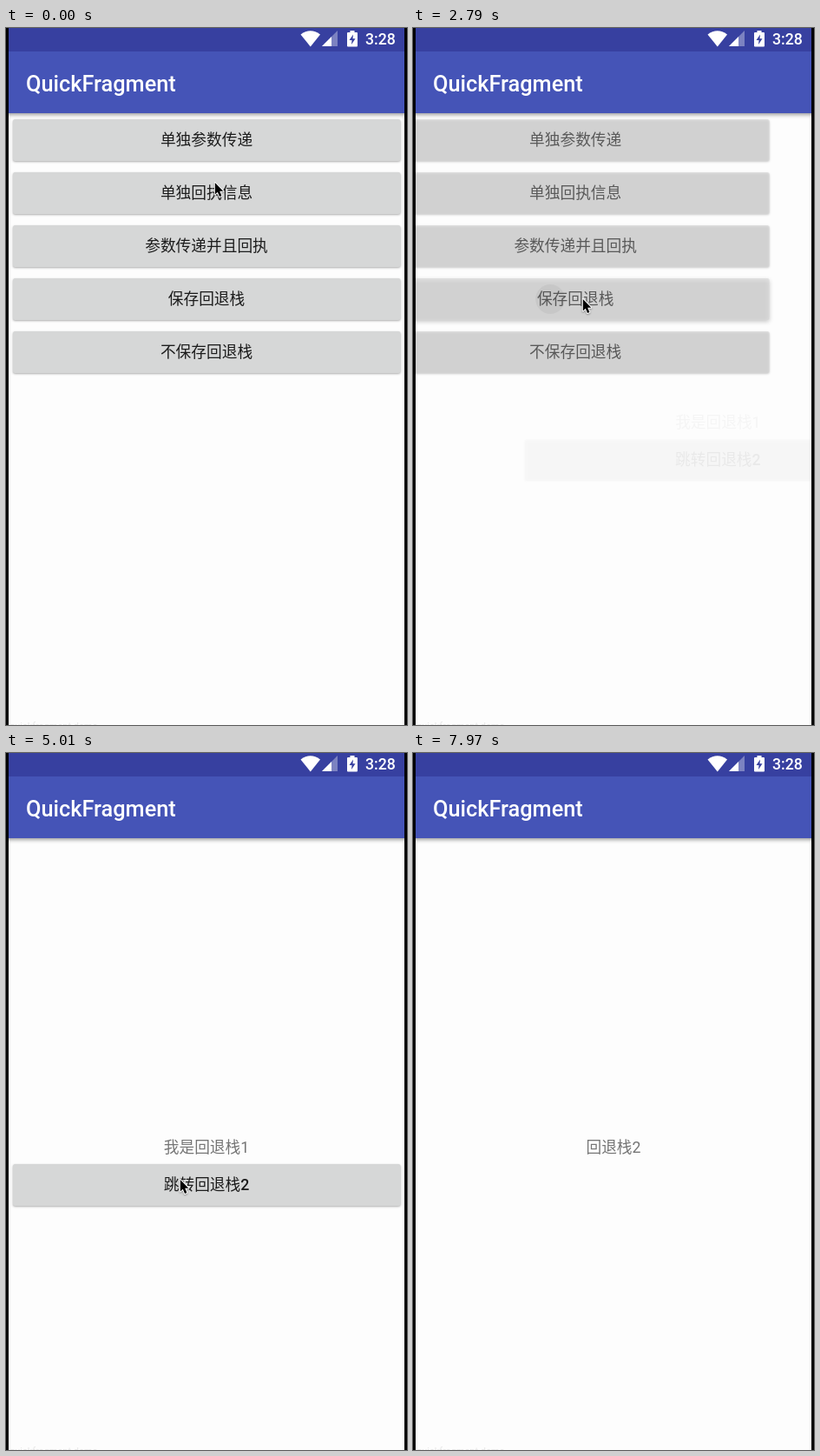
Animation, 462 px wide and 802 px high, one loop 8 s. Source, as an HTML page with a canvas:

```html
<!DOCTYPE html>
<html lang="zh-CN">
<head>
<meta charset="utf-8">
<title>QuickFragment</title>
<style>
html, body { margin: 0; width: 100%; height: 100%; overflow: hidden; background: #000; }
canvas { display: block; width: 462px; height: 802px; }
</style>
</head>
<body>
<canvas id="stage" width="462" height="802"></canvas>
<script>
const ctx = document.getElementById('stage').getContext('2d');
const LOOP = 8000, TICK = 147.3;
const FONT = 'Roboto, "Noto Sans CJK SC", "Noto Sans CJK", sans-serif';
const STATUS = '#3740a0', BAR = '#4554b7', PAGE = '#fdfdfd';
const CENTER = 231, SLIDE = 128;
const ENTER_MS = 1219, EXIT_MS = 557;
const OPEN_FIRST = 2726, OPEN_SECOND = 5377, PRESS_SECOND = 5100;
const MENU = ['单独参数传递', '单独回执信息', '参数传递并且回执', '保存回退栈', '不保存回退栈'];

// Pointer path: [tick, x, y]
const PATH = [
  [0, 240, 177], [2, 237, 159], [5, 230, 323], [8, 221, 268], [10, 209, 200],
  [12, 221, 134], [13, 221, 134], [17, 195, 311], [19, 195, 311], [26, 200, 433],
  [33, 200, 490], [44, 200, 490], [49, 431, 525]
];
const POINTER_GONE = 50;

const clamp = v => Math.max(0, Math.min(1, v));
const lerp = (a, b, p) => a + (b - a) * p;

function polygon(points, color) {
  ctx.beginPath();
  points.forEach(([x, y]) => ctx.lineTo(x, y));
  ctx.closePath();
  ctx.fillStyle = color;
  ctx.fill();
}

function label(text, x, y, color, size = 17.7, weight = 400, align = 'center') {
  ctx.font = `${weight} ${size}px ${FONT}`;
  ctx.textAlign = align;
  ctx.fillStyle = color;
  ctx.fillText(text, x, y);
}

function button(text, y, weight, ripple) {
  ctx.save();
  ctx.beginPath();
  ctx.roundRect(8, y, 446.5, 48, 2.5);
  ctx.shadowColor = 'rgba(0,0,0,.32)';
  ctx.shadowBlur = ripple ? 5 : 2.5;
  ctx.shadowOffsetY = ripple ? 2 : 1;
  ctx.fillStyle = '#d6d7d7';
  ctx.fill();
  ctx.shadowColor = 'transparent';
  if (ripple) {
    ctx.clip();
    ctx.beginPath();
    ctx.arc(ripple.x, y + 24, ripple.r, 0, Math.PI * 2);
    ctx.fillStyle = 'rgba(0,0,0,.07)';
    ctx.fill();
  }
  ctx.restore();
  label(text, CENTER, y + 30.3, '#1c1c1c', 17.7, weight);
}

function menuPage(t) {
  const ripple = t >= OPEN_FIRST ? { x: 202, r: 17 + (t - OPEN_FIRST - 73) / 8 } : null;
  MENU.forEach((text, i) => button(text, 105 + 61 * i, 400, i === 3 && ripple));
}

function firstPage(t) {
  const held = t - PRESS_SECOND;
  const ripple = held >= 0 ? { x: 201, r: 8 + held / 14 } : null;
  label('我是回退栈1', CENTER, 460.3, '#757575');
  button('跳转回退栈2', 473, 500, ripple);
}

function secondPage() {
  label('回退栈2', CENTER, 460.3, '#757575');
}

// Pages enter from the right at a steady rate; the leaving page eases off to the left.
function page(draw, t, opens, closes) {
  if (t < opens) return;
  const shown = clamp((t - opens) / ENTER_MS);
  const left = 1 - (1 - clamp((t - closes) / EXIT_MS)) ** 3;
  const alpha = shown * (1 - left);
  if (alpha <= 0) return;
  ctx.save();
  ctx.globalAlpha = alpha;
  ctx.translate(SLIDE * (1 - shown - left), 0);
  draw(t);
  ctx.restore();
}

function statusIcons() {
  ctx.beginPath();
  ctx.moveTo(339.5, 7.5);
  ctx.quadraticCurveTo(350.8, -0.8, 362, 7.5);
  ctx.lineTo(350.8, 21.5);
  ctx.closePath();
  ctx.fillStyle = '#fff';
  ctx.fill();

  polygon([[382, 3], [382, 21], [364, 21]], 'rgba(255,255,255,.35)');
  polygon([[375, 10], [375, 21], [364, 21]], '#fff');

  ctx.fillStyle = '#fff';
  ctx.fillRect(396.5, 3, 5, 3);
  ctx.beginPath();
  ctx.roundRect(393, 5, 12, 16.5, 1);
  ctx.fill();
  polygon([[400, 7.5], [395.5, 14], [398.5, 14], [398, 19], [402.5, 12.3], [399.5, 12.3]], STATUS);
  label('3:28', 414, 19.2, '#fff', 17.7, 500, 'left');
}

function chrome() {
  ctx.save();
  ctx.shadowColor = 'rgba(0,0,0,.45)';
  ctx.shadowBlur = 5;
  ctx.shadowOffsetY = 1.5;
  ctx.fillStyle = BAR;
  ctx.fillRect(0, 27, 462, 71);
  ctx.restore();
  ctx.fillStyle = STATUS;
  ctx.fillRect(0, 0, 462, 27);
  statusIcons();
  label('QuickFragment', 23, 73, '#fff', 25.3, 500, 'left');
  label('quickfragment demo', 4, 807, '#e6e6e6', 11, 400, 'left');
  ctx.fillStyle = '#000';
  ctx.fillRect(0, 0, 3, 802);
  ctx.fillRect(459, 0, 3, 802);
}

function pointer(tick) {
  if (tick >= POINTER_GONE) return;
  const i = Math.max(1, PATH.findIndex(key => key[0] >= tick));
  const [t0, x0, y0] = PATH[i - 1], [t1, x1, y1] = PATH[i];
  const p = clamp((tick - t0) / (t1 - t0));
  ctx.save();
  ctx.translate(lerp(x0, x1, p) + 0.8, lerp(y0, y1, p) + 1);
  ctx.lineJoin = 'round';
  ctx.lineWidth = 2;
  ctx.strokeStyle = '#fff';
  ctx.shadowColor = 'rgba(0,0,0,.35)';
  ctx.shadowBlur = 2;
  ctx.shadowOffsetY = 1;
  const arrow = [[0, 0], [0, 13.5], [3, 10.7], [5.2, 16], [7.6, 15], [5.4, 9.8], [9.5, 9.8]];
  ctx.beginPath();
  arrow.forEach(([x, y]) => ctx.lineTo(x, y));
  ctx.closePath();
  ctx.stroke();
  ctx.shadowColor = 'transparent';
  polygon(arrow, '#000');
  ctx.restore();
}

function frame(now) {
  const tick = Math.floor((now % LOOP + 12) / TICK);
  const t = tick * TICK;
  ctx.fillStyle = PAGE;
  ctx.fillRect(0, 0, 462, 802);
  page(menuPage, t, -ENTER_MS, OPEN_FIRST);
  page(firstPage, t, OPEN_FIRST, OPEN_SECOND);
  page(secondPage, t, OPEN_SECOND, Infinity);
  chrome();
  pointer(tick);
}

const start = performance.now();
function loop() {
  frame(performance.now() - start);
  requestAnimationFrame(loop);
}
loop();
</script>
</body>
</html>
```
